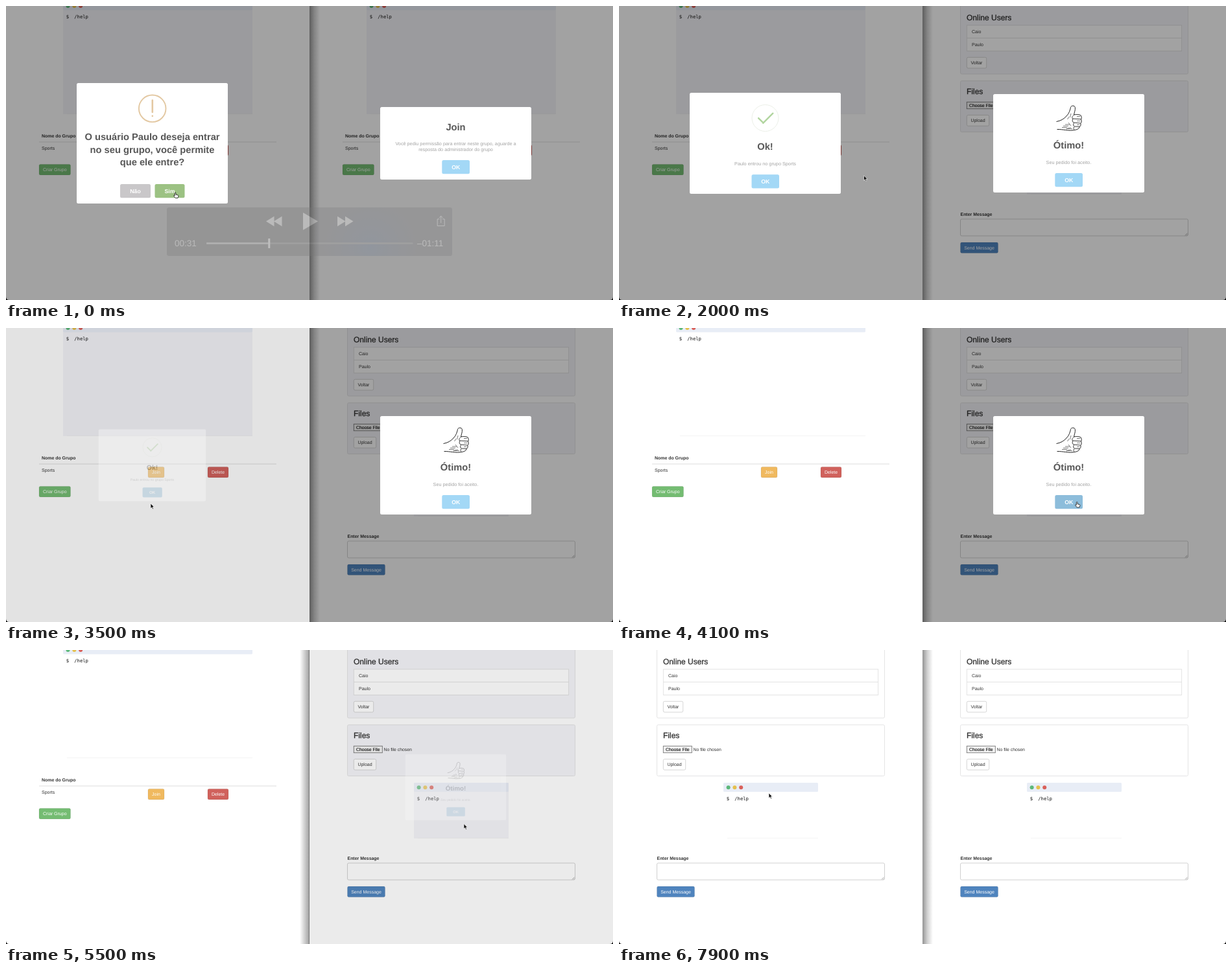
Write an HTML page that moves like this. It is 936 by 454 pixels and loops after 8 s.

```html
<!DOCTYPE html>
<html lang="pt">
<head>
<meta charset="utf-8">
<style>
  html, body { margin: 0; width: 100%; height: 100%; overflow: hidden; background: #fff; }
  svg { display: block; width: 936px; height: 454px; }
  text { font-family: "Liberation Sans", Arial, sans-serif; text-rendering: geometricPrecision; white-space: pre; }
  .mono { font-family: "DejaVu Sans Mono", monospace; }
  .tint { fill: var(--tint); }
</style>
</head>
<body>
<svg id="stage" viewBox="0 0 936 454"></svg>
<script>
const LOOP = 8000, SPLIT = 468, DIM = 0.365;
const stage = document.getElementById('stage');
const $ = id => document.getElementById(id);

// markup helpers
const box = (x, y, w, h, fill, extra = '') =>
  `<rect x="${x}" y="${y}" width="${w}" height="${h}" fill="${fill}" ${extra}/>`;
const text = (x, y, str, size = 7, fill = '#333', extra = '') =>
  `<text x="${x}" y="${y}" font-size="${size}" fill="${fill}" ${extra}>${str}</text>`;
const mid = 'text-anchor="middle"', bold = 'font-weight="bold"';
const path = (d, extra) => `<path d="${d}" ${extra}/>`;
const faint = body => `<g class="faint">${body}</g>`;

const button = (x, y, w, h, label, fill) =>
  box(x, y, w, h, fill, `rx="2" stroke="#000" stroke-opacity=".12" stroke-width=".6"`) +
  text(x + w / 2, y + h / 2 + 2.5, label, 7, '#fff', mid);
const plain = (x, y, w, h, label) =>
  faint(box(x, y, w, h, '#fff', 'rx="2" stroke="#ccc" stroke-width=".8"')) +
  text(x + w / 2, y + h / 2 + 2.5, label, 7, '#333', mid);
const heading = (x, y, str) => text(x, y, str, 12, '#333', 'stroke="#333" stroke-width=".3"');

function terminal(x, top, w, headH, bottom, dotX, dotY, baseline) {
  const dots = ['#5cb87a', '#e5c04e', '#d9605a']
    .map((c, i) => `<circle cx="${dotX + i * 9.8}" cy="${dotY}" r="3" fill="${c}"/>`).join('');
  return faint(
      `<rect class="tint" x="${x}" y="${top}" width="${w}" height="${bottom - top}"/>` +
      path(`M${x + 6} ${bottom - .5}h${w - 6}`, 'stroke="#f0f0f0" stroke-width=".7"') +
      box(x, top, w, headH, '#e8edf6', 'rx="1.5"')) + dots +
    text(x + 4.7, baseline, '$', 7.2, '#111', 'class="mono"') +
    text(x + 17.3, baseline, '/help', 7.2, '#111', 'class="mono"');
}

const groupsPage = () =>
  terminal(88, -8, 292, 14.5, 167, 95.5, 0, 19) +
  text(55, 203, 'Nome do Grupo', 6.95, '#333', bold) +
  faint(box(51, 209.5, 366, 1, '#ddd')) +
  text(55, 221.5, 'Sports') +
  button(219, 214.5, 25, 16.5, 'Join', '#f0b95f') +
  button(311, 214.5, 32, 16.5, 'Delete', '#d0615c') +
  button(51, 244.5, 48.5, 16.5, 'Criar Grupo', '#74bc72');

const panel = (y, h) =>
  faint(`<rect class="tint" x="58.5" y="${y}" width="351" height="${h}" rx="2" stroke="#e1e1e3" stroke-width=".9"/>`);

const chatPage = () =>
  panel(-8, 113) + heading(68, 22, 'Online Users') +
  faint(box(68.3, 29.8, 331.4, 39.7, '#fff', 'stroke="#ddd" stroke-width=".8"') +
        box(68.3, 49.2, 331.4, .8, '#ddd')) +
  text(76, 42, 'Caio') + text(76, 61.8, 'Paulo') +
  plain(68.3, 79.3, 30.4, 16.7, 'Voltar') +
  panel(115.6, 78.9) + heading(68, 136, 'Files') +
  box(68.3, 148.3, 44, 10.4, '#f2f2f2', 'stroke="#777" stroke-width=".9"') +
  text(72, 156, 'Choose File', 6.85, '#111', 'stroke="#111" stroke-width=".12"') +
  text(114.5, 156, 'No file chosen', 6.85) +
  plain(68.3, 168.5, 34.4, 16.7, 'Upload') +
  terminal(161, 205, 146, 14, 291, 168.6, 212.2, 231.5) +
  text(58.5, 324, 'Enter Message', 6.95, '#333', bold) +
  faint(box(58.5, 329, 351, 26, '#fff', 'rx="2" stroke="#ccc" stroke-width=".9"')) +
  path('M405 354.3l3.6-3.6M407 354.5l1.8-1.8', 'stroke="#777" stroke-width=".6"') +
  button(58.5, 365, 58, 16.5, 'Send Message', '#4f84be');

// dialogs
const card = (cx, y, h, body) =>
  box(cx - 116.5, y, 233, h, '#fff', 'rx="2.5"') + body;
const title = (x, y, str, size = 14.7) => text(x, y, str, size, '#575757', mid + ' ' + bold);
const note = (x, y, str) => text(x, y, str, 7.28, '#a3a3a3', mid);
const action = (x, y, w, label, fill, id = '') =>
  box(x, y, w, 21.3, fill, `rx="2.5" ${id && `id="${id}"`}`) +
  text(x + w / 2, y + 14, label, 8.7, '#fff', mid + ' ' + bold);
const BLUE = '#a3d8f6', BLUE_HOVER = '#8dbddb';

const askDialog = card(225.5, 119, 186,
  '<circle cx="225.7" cy="158.3" r="20.8" fill="none" stroke="#e3c8a2" stroke-width="1.9"/>' +
  path('M225.8 145.5v18.5M225.8 169.8v.1', 'stroke="#e3c8a2" stroke-width="2.6" stroke-linecap="round"') +
  title(225.5, 207, 'O usuário Paulo deseja entrar') +
  title(225.5, 226.5, 'no seu grupo, você permite') +
  title(225.5, 246, 'que ele entre?') +
  action(176, 275, 47, 'Não', '#c9c7c9') + action(229.5, 275, 46, 'Sim', '#9cc283'));

const okDialog = card(225.5, 134, 156,
  '<circle cx="225.5" cy="173" r="20.5" fill="none" stroke="#e9eee5" stroke-width=".9"/>' +
  '<g fill="#b2d5a0"><rect id="tip" height="2.5" rx="1"/><rect id="long" height="2.5" rx="1"/></g>' +
  title(225.5, 222, 'Ok!') + note(225.5, 246, 'Paulo entrou no grupo Sports') +
  action(204.5, 260.3, 42.5, 'OK', BLUE, 'okLeft'));

const joinDialog = card(693.5, 156, 112,
  title(693.5, 191.5, 'Join') +
  note(693.5, 215, 'Você pediu permissão para entrar neste grupo, aguarde a') +
  note(693.5, 224, 'resposta do administrador do grupo') +
  action(672.3, 238, 42.7, 'OK', BLUE));

const thumb =
  path('M674.5 178.5C681 177.5 686 174.500 690 170C694 166 695.5 161 696.500 156.500C697 153.500 702.500 153.200 703.300 156.500C704 160.500 702 164.500 701.500 168C705 167.300 712 167 712.600 170C713.600 172 713.200 174 712.500 175C713.800 178 713 180.500 711.800 181C712.500 184 711.500 186 710 186.500C710 190 705 191.500 699 192C692 192.800 686 190.500 675.500 190.500',
    'fill="#fff" stroke="#222" stroke-width="1"') +
  path('M701.500 168.500C699 170 698 172 699.500 174L712 174.800M700 174C698.500 176.500 699 179 701 180L711.500 181M701.500 180.500C700 183 700.500 185.500 702.500 186L710 186.500M702 186.500C700.500 188.500 701 190.500 702.500 191.500',
    'fill="none" stroke="#222" stroke-width=".9"') +
  path('M683 187.500h8M685 185.300h8M688 183h7M689 189.600h10M694 171l-2.500 4M697 166l-1.500 6M706 170.500h5M706 177.500h5M706 183.500h4M693 180l4 5M691 189l6-1',
    'fill="none" stroke="#444" stroke-width=".7"');

const greatDialog = card(693.5, 136, 152,
  thumb + title(693.5, 220, 'Ótimo!') + note(693.5, 244, 'Seu pedido foi aceito.') +
  action(672.3, 258, 42.7, 'OK', BLUE, 'okRight'));

// player controls
const skip = (x, dir) =>
  path(`M${x} 332.500l${12.5 * dir}-7.700v15.400zM${x + 12 * dir} 332.500l${12.5 * dir}-7.700v15.400z`, '');
const player =
  box(248, 311, 440, 75, '#777', 'rx="3.5" fill-opacity=".97"') +
  box(476, 311, 212, 75, 'url(#glow)', 'rx="3.5"') +
  '<g fill="#f2f2f2">' + skip(401, 1) + skip(535.5, -1) +
  path('M458 319v27l23-13.500z', 'id="play"') +
  path('M458 321h7.500v24h-7.500zM470 321h7.500v24h-7.500z', 'id="pause"') + '</g>' +
  path('M668.500 329h-3.300v10.500h11v-10.500h-3.300M670.700 335v-10.500M667.800 327.200l2.900-2.900l2.900 2.900',
    'fill="none" stroke="#eee" stroke-width="1"') +
  text(260, 371.3, '00:31', 13.5, '#f2f2f2') + text(634, 371.3, '–01:11', 13.5, '#f2f2f2') +
  box(309, 365.3, 318.5, 2.5, '#9c9c9c', 'rx="1"') +
  box(309, 365.3, 97, 2.5, '#d2d2d2', 'rx="1" id="played"') +
  box(404.3, 359, 3, 15, '#fff', 'id="knob" rx=".6"');

const arrow = path('M0 0v7.600l1.800-1.600l1.300 2.800l1.300-.6l-1.300-2.700h2.400z',
  'fill="#111" stroke="#fff" stroke-width=".6"');
const hand = path('M-.7 1C-.7-.3 1-.3 1 1V3.300L4 4C5 4.300 5 5 4.800 6L4 8.500H.2L-2.300 5.400C-2.800 4.400-1.800 3.900-.7 5z',
  'fill="#fff" stroke="#111" stroke-width=".8"');

const side = (id, dx) =>
  `<g id="page${id}"><g transform="translate(${dx})">${box(0, 0, 468, 454, '#fff')}` +
  `<g id="groups${id}">${groupsPage()}</g><g id="chat${id}">${chatPage()}</g></g></g>` +
  box(dx, 0, 468, 454, '#000', `id="dim${id}"`);
const fade = (id, from, to) =>
  `<linearGradient id="${id}"><stop stop-opacity="${from}"/><stop offset=".45" stop-opacity="${(from + to) * .45}"/>` +
  `<stop offset="1" stop-opacity="${to}"/></linearGradient>`;

stage.innerHTML =
  `<defs>${fade('shadeR', .42, 0)}${fade('shadeL', 0, .38)}
  <radialGradient id="glow" gradientUnits="userSpaceOnUse" cx="562" cy="373" r="78">
    <stop stop-color="#5d7fb0" stop-opacity=".5"/><stop offset="1" stop-color="#858590" stop-opacity=".3"/>
  </radialGradient></defs>` +
  side('L', 0) + side('R', SPLIT) +
  box(SPLIT, 0, 16, 454, 'url(#shadeR)', 'id="shadowR"') +
  `<g id="shadowL">${box(453, 0, 15, 454, 'url(#shadeL)')}${box(467.2, 0, .8, 454, '#000', 'opacity=".35"')}</g>` +
  path('M0 449v5h5q-5 0-5-5zM936 449v5h-5q5 0 5-5z', 'fill="#000"') +
  `<g id="ask">${askDialog}</g><g id="ok">${okDialog}</g>` +
  `<g id="join">${joinDialog}</g><g id="great">${greatDialog}</g>` +
  `<g id="cursor"><g id="arrow">${arrow}</g><g id="hand">${hand}</g></g>` +
  `<g id="player">${player}</g>`;

// timing helpers
const clamp = v => Math.max(0, Math.min(1, v));
const ramp = (t, a, b) => clamp((t - a) / (b - a));
const ease = p => p * p * (3 - 2 * p);
const show = (id, on) => { $(id).style.display = on ? '' : 'none'; };

// rows: [time, value, value, ...]
function track(rows, t, curve = p => p) {
  if (t <= rows[0][0]) return rows[0].slice(1);
  for (let i = 1; i < rows.length; i++) {
    const a = rows[i - 1], b = rows[i];
    if (t <= b[0]) {
      const p = curve((t - a[0]) / (b[0] - a[0]));
      return a.slice(1).map((v, k) => v + (b[k + 1] - v) * p);
    }
  }
  return rows[rows.length - 1].slice(1);
}

const OK_AT = 475, GREAT_AT = 600, CLOSE_L = 3413, CLOSE_R = 5400;
const FOCUS_R = 4400, FOCUS_L = 6900, ENTER = 7100;
const POP = [[0, .7], [.45, 1.05], [.8, .95], [1, 1]];
const TIP = [[.54, 1, 19, 0], [.7, -8, 37, 50], [.84, 17, 48, 17], [1, 14, 45, 25]];
const LONG = [[.65, 34, 54, 0], [.84, 25, 35, 55], [1, 25, 38, 47]];
const MOUSE = [[500, 261, 288], [900, 593.5, 249], [1500, 593.5, 249], [2400, 223, 271],
  [3550, 223, 271], [3900, 706, 268.500], [5700, 706, 268.500], [6200, 270, 229], [6500, 231, 221]];

function dialog(id, cx, cy, t, open, close) {
  const p = ramp(t, close, close + 150);
  show(id, t >= open && p < 1);
  const k = track(POP, ramp(t, open, open + 300))[0] * (1 - .5 * p);
  $(id).setAttribute('transform', `translate(${cx} ${cy}) scale(${k}) translate(${-cx} ${-cy})`);
  $(id).setAttribute('opacity', (1 - p) ** 1.3);
}

function stroke(id, rows, p, angle) {
  const [x, y, w] = track(rows, p).map(v => v / 2);
  const el = $(id);
  el.setAttribute('x', 205.500 + x);
  el.setAttribute('y', 153 + y);
  el.setAttribute('width', w);
  el.setAttribute('transform', `rotate(${angle} ${205.500 + x + w / 2} ${154.250 + y})`);
}

function dimSide(id, t, close) {
  const alpha = DIM * (1 - ramp(t, close, close + 150)) ** 1.4;
  $('dim' + id).setAttribute('opacity', alpha);
  $('page' + id).style.setProperty('--tint', alpha > 0 ? '#f4f4f8' : '#fff');
}

const faints = stage.querySelectorAll('.faint');

function draw(t) {
  show('groupsL', t < ENTER);
  show('chatL', t >= ENTER);
  show('groupsR', t < GREAT_AT);
  show('chatR', t >= GREAT_AT);
  const washed = t >= 2300 && t < 3000;
  faints.forEach(el => { el.style.opacity = washed ? 0 : 1; });

  dimSide('L', t, CLOSE_L);
  dimSide('R', t, CLOSE_R);
  const rightFront = t >= FOCUS_R && t < FOCUS_L;
  show('shadowL', rightFront);
  show('shadowR', !rightFront);

  show('ask', t < OK_AT);
  show('join', t < GREAT_AT);
  dialog('ok', 225.5, 212, t, OK_AT, CLOSE_L);
  dialog('great', 693.5, 212, t, GREAT_AT, CLOSE_R);
  const check = ramp(t, OK_AT, OK_AT + 750);
  stroke('tip', TIP, check, 45);
  stroke('long', LONG, check, -45);
  $('okLeft').setAttribute('fill', t >= 2400 ? BLUE_HOVER : BLUE);
  $('okRight').setAttribute('fill', t >= 3900 ? BLUE_HOVER : BLUE);

  const [mx, my] = track(MOUSE, t, ease);
  const pointing = t <= 500 || (t >= 2400 && t < CLOSE_L) || (t >= 3900 && t < CLOSE_R) ||
    (t >= 6500 && t < ENTER);
  $('cursor').setAttribute('transform', `translate(${mx} ${my})`);
  show('hand', pointing);
  show('arrow', !pointing);

  const vis = Math.min(.3 + .7 * ramp(t, 0, 200), 1 - ramp(t, 1500, 1900));
  show('player', vis > 0);
  $('player').setAttribute('opacity', vis);
  show('play', t < 400);
  show('pause', t >= 400);
  const head = 405.8 + Math.max(0, t - 400) * .0045;
  $('knob').setAttribute('x', head - 1.5);
  $('played').setAttribute('width', head - 309);
}

const start = performance.now();
function tick(now) {
  draw(Math.floor(Math.max(0, now - start) % LOOP / 100) * 100);
  requestAnimationFrame(tick);
}
draw(0);
requestAnimationFrame(tick);
</script>
</body>
</html>
```
